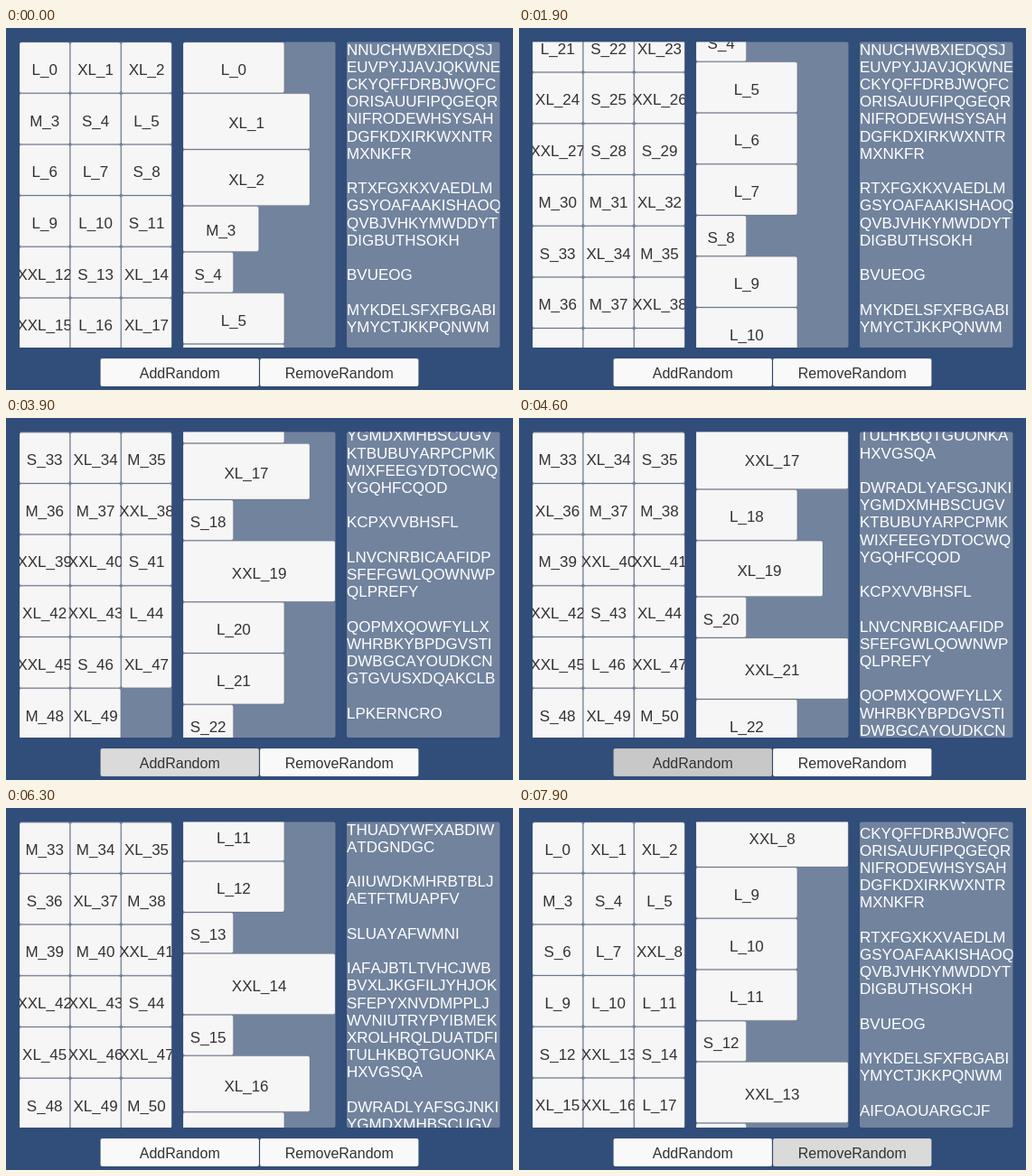
An HTML page for the animation above (8 s loop, 561 by 401 pixels).

```html
<!DOCTYPE html>
<html lang="en">
<head>
<meta charset="utf-8">
<title>Virtual lists</title>
<style>
  html, body { margin: 0; width: 100%; height: 100%; overflow: hidden; background: #314d79; }
  svg { display: block; width: 561px; height: 401px; font: 17px "Liberation Sans", Arial, sans-serif; font-kerning: none; }
  .panel { fill: #72839e; }
  .cell { stroke: #323232; stroke-opacity: .2; stroke-width: .8; }
  .label { fill: #323232; text-anchor: middle; }
  #prose { fill: #fff; }
  #buttons { font-size: 16px; }
</style>
</head>
<body>
<svg viewBox="0 0 561 401">
  <defs>
    <clipPath id="view"><path d="M15 15.5h168.5v338.5h-168.5zM196 15.5h168.5v338.5h-168.5zM377 15.5h169.5v338.5h-169.5z"/></clipPath>
  </defs>
  <rect class="panel" x="15" y="15.5" width="168.5" height="338.5" rx="2"/>
  <rect class="panel" x="196" y="15.5" width="168.5" height="338.5" rx="2"/>
  <rect class="panel" x="377" y="15.5" width="169.5" height="338.5" rx="2"/>
  <g clip-path="url(#view)">
    <g id="grid"></g>
    <g id="list"></g>
    <g id="prose"></g>
  </g>
  <g id="buttons"></g>
</svg>
<script>
const LOOP = 8000, STEP = 100, TOP = 16, BOTTOM = 354;
const UNIT = 5.67, COLUMN = 56.4, LINE = 19.2, GAP = 1;
const RANKS = ['S', 'M', 'L', 'XL', 'XXL'];

const SIZES = `L XL XL M S L L L S L L S XXL S XL XXL L XL S XXL L L S XL XL
  S XXL XXL S S M M XL S XL M M M XXL XXL XXL S XL XXL L XXL S XL M XL`.split(/\s+/);

const PARAGRAPHS = [
  'NNUCHWBXIEDQSJ EUVPYJJAVJQKWNE CKYQFFDRBJWQFC ORISAUUFIPQGEQR NIFRODEWHSYSAH DGFKDXIRKWXNTR MXNKFR',
  'RTXFGXKXVAEDLM GSYOAFAAKISHAOQ QVBJVHKYMWDDYT DIGBUTHSOKH',
  'BVUEOG',
  'MYKDELSFXFBGABI YMYCTJKKPQNWM',
  'THUADYWFXABDIW ATDGNDGC',
  'SLUAYAFWMNI',
  'IAFAJBTLTVHCJWB BVXLJKGFILJYHJOK SFEPYXNVDMPPLJ WVNIUTRYPYIBMEK XROLHRQLDUATDFI TULHKBQTGUONKA HXVGSQA',
  'DWRADLYAFSGJNKI YGMDXMHBSCUGV KTBUBUYARPCPMK WIXFEEGYDTOCWQ YGQHFCQOD',
  'KCPXVVBHSFL',
  'LNVCNRBICAAFIDP SFEFGWLQOWNWP QLPREFY',
  'QOPMXQOWFYLLX WHRBKYBPDGVSTI DWBGCAYOUDKCN GTGVUSXDQAKCLB',
  'LPKERNCRO'
];

const insert = (index, value) => items => items.splice(index, 0, value);
const remove = index => items => items.splice(index, 1);

// Runs of clicks: one press every PERIOD ms, taking effect on release.
const PERIOD = 300, HOLD = 200;
const RUNS = [
  { button: 'AddRandom', start: 3900, presses: 4,
    sizes: [insert(6, 'S'), insert(8, 'XXL'), insert(17, 'L'), insert(27, 'M')],
    prose: [insert(4, 'AIFOAOUARGCJF'), insert(5, 'KWEDRNTUOB'), insert(7, 'AIIUWDKMHRBTBLJ AETFTMUAPFV')] },
  { button: 'RemoveRandom', start: 5300, presses: 2, sizes: [remove(27), remove(47)], prose: [remove(5)] },
  { button: 'RemoveRandom', start: 7300, presses: 3, sizes: [remove(17), remove(10)], prose: [] }
];

// [time, offset] at the start and end of each scroll gesture.
const SCROLL = {
  grid: [[1000, 0], [1900, 420], [2700, 473], [3500, 623.5], [6400, 623.5], [7300, 0]],
  list: [[1600, 0], [1900, 256], [2700, 829], [3900, 940], [5700, 947.5], [6300, 620], [7900, 454.6]],
  prose: [[2400, 0], [2700, 346], [3500, 618.5], [5500, 618.5], [6300, 384], [6900, 384], [7900, 34.4]]
};

// Scrolling coasts: speed decays with a time constant of half a second.
const coast = ms => 1 - Math.exp(-ms / 500);

function scrollAt(keys, t) {
  const next = keys.findIndex(([time]) => time > t);
  if (next === 0) return keys[0][1];
  if (next < 0) return keys.at(-1)[1];
  const [t0, from] = keys[next - 1], [t1, to] = keys[next];
  return from + (to - from) * coast(t - t0) / coast(t1 - t0);
}

function edited(kind, values, t) {
  const items = [...values];
  for (const run of RUNS) {
    run[kind].forEach((edit, i) => {
      if (t >= run.start + i * PERIOD + HOLD) edit(items);
    });
  }
  return items;
}

function buttonColor(button, t) {
  for (const run of RUNS) {
    const elapsed = t - run.start, phase = elapsed % PERIOD;
    const active = run.button === button && elapsed >= 0 && elapsed < run.presses * PERIOD;
    if (active && phase < HOLD) return phase < STEP ? '#dadada' : '#c8c8c8';
  }
  return '#f9f9f9';
}

const visible = (y, height) => y + height > TOP - 2 && y < BOTTOM;

function box(x, y, width, height, text, fill = '#f6f6f6', drop = 8) {
  return `<rect class="cell" fill="${fill}" x="${x}" y="${y}" width="${width}" height="${height}" rx="2"/>` +
    `<text class="label" x="${x + width / 2}" y="${y + height / 2 + drop}">${text}</text>`;
}

function drawGrid(sizes, scroll) {
  const pitch = 10 * UNIT;
  return sizes.map((size, i) => {
    const y = TOP + Math.floor(i / 3) * pitch - scroll;
    return visible(y, pitch) ? box(15 + i % 3 * COLUMN, y, COLUMN - GAP, pitch - GAP, `${size}_${i}`) : '';
  }).join('');
}

function drawList(sizes, scroll) {
  let y = TOP - scroll;
  return sizes.map((size, i) => {
    const rank = RANKS.indexOf(size), top = y, pitch = (8 + rank) * UNIT;
    y += pitch;
    return visible(top, pitch) ? box(196, top, (rank + 2) * COLUMN / 2 - GAP, pitch - GAP, `${size}_${i}`) : '';
  }).join('');
}

function drawProse(paragraphs, scroll) {
  return paragraphs.flatMap(p => [...p.split(' '), '']).map((line, i) => {
    const y = TOP + i * LINE - scroll;
    return line && visible(y, LINE) ? `<text x="377" y="${y + 13.5}">${line}</text>` : '';
  }).join('');
}

const drawButton = (x, name, t) => box(x, 366, 175.5, 31, name, buttonColor(name, t), 6);

const [grid, list, prose, buttons] =
  ['grid', 'list', 'prose', 'buttons'].map(id => document.getElementById(id));
let shown = -1;

function frame() {
  const t = Math.floor(performance.now() % LOOP / STEP) * STEP;
  if (t !== shown) {
    shown = t;
    const sizes = edited('sizes', SIZES, t);
    grid.innerHTML = drawGrid(sizes, scrollAt(SCROLL.grid, t));
    list.innerHTML = drawList(sizes, scrollAt(SCROLL.list, t));
    prose.innerHTML = drawProse(edited('prose', PARAGRAPHS, t), scrollAt(SCROLL.prose, t));
    buttons.innerHTML = drawButton(104.5, 'AddRandom', t) + drawButton(281, 'RemoveRandom', t);
  }
  requestAnimationFrame(frame);
}
frame();
</script>
</body>
</html>
```
